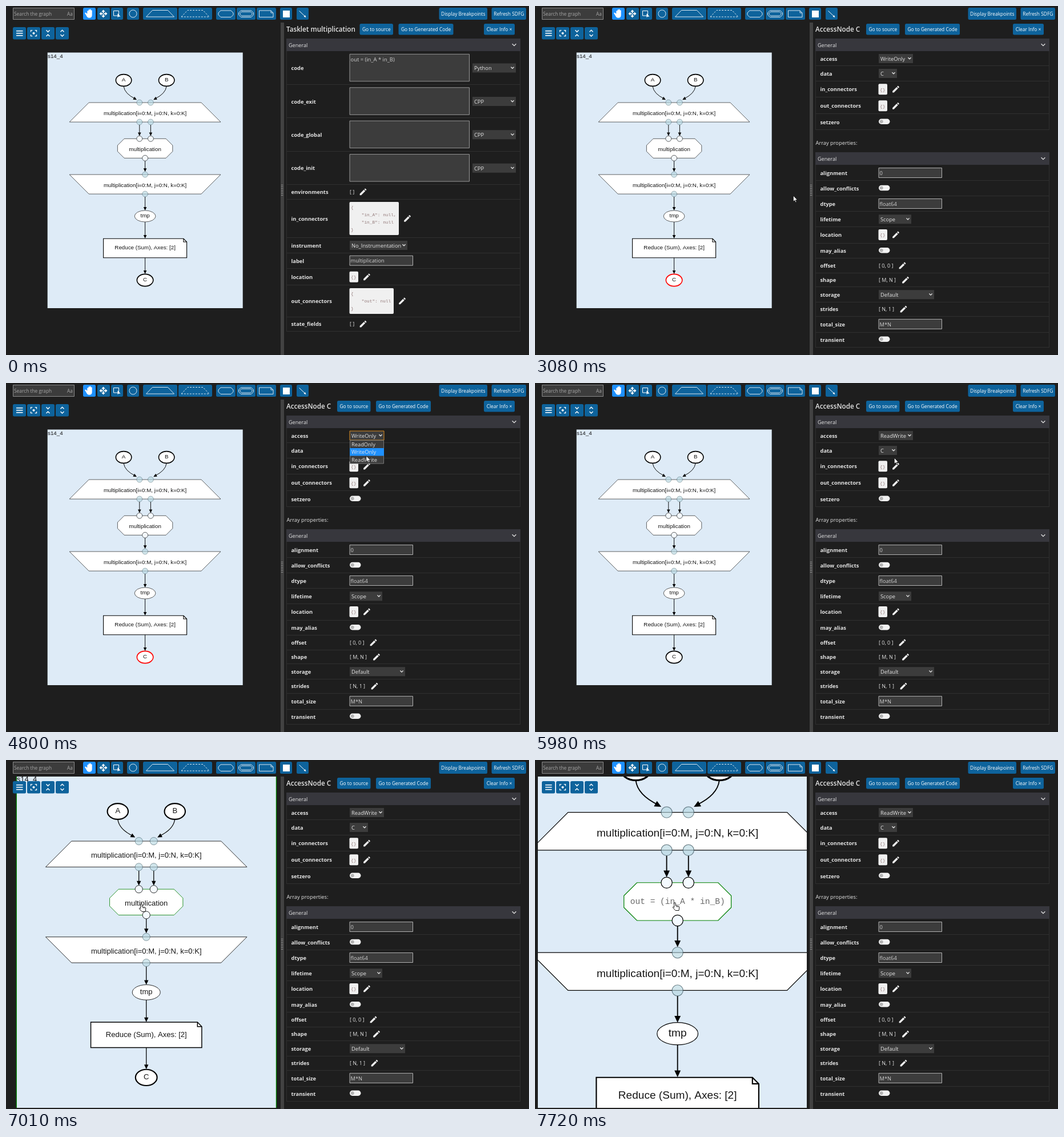
Animation, 916 px wide and 611 px high, one loop 8000 ms. Source, as an HTML page with a canvas:

```html
<!DOCTYPE html>
<html lang="en">
<head>
<meta charset="utf-8">
<title>Graph editor</title>
<style>
html, body { margin: 0; width: 100%; height: 100%; overflow: hidden; background: #1e1e1e; }
canvas { display: block; }
</style>
</head>
<body>
<canvas id="stage" width="916" height="611"></canvas>
<script>
const ctx = document.getElementById('stage').getContext('2d');
const LOOP = 8000;
const UI = '"Open Sans", "Noto Sans", sans-serif';
const ARIAL = '"Liberation Sans", Arial, sans-serif';
const MONO = '"Liberation Mono", "Courier New", monospace';
const BLUE = '#0e639c', BRIGHT = '#1e90ff', FIELD = '#3c3c3c', LINE = '#303030', INK = '#e4e4e4', GREEN = '#008000';

// ---------- drawing helpers ----------
function text(s, x, y, size = 9.3, color = INK, font = UI, weight = 400, align = 'left') {
  ctx.font = `${weight} ${size}px ${font}`;
  ctx.fillStyle = color;
  ctx.textAlign = align;
  ctx.fillText(s, x, y + size * 0.36);
}
function rect(x, y, w, h, fill, stroke, r = 0) {
  ctx.beginPath();
  ctx.roundRect(x, y, w, h, r);
  paint(fill, stroke);
}
function poly(points, fill, stroke, width = 1, open) {
  ctx.beginPath();
  points.forEach(([x, y]) => ctx.lineTo(x, y));
  if (!open) ctx.closePath();
  paint(fill, stroke, width);
}
function oval(x, y, rx, ry, fill, stroke, width = 1) {
  ctx.beginPath();
  ctx.ellipse(x, y, rx, ry, 0, 0, Math.PI * 2);
  paint(fill, stroke, width);
}
function paint(fill, stroke, width = 1) {
  if (fill) { ctx.fillStyle = fill; ctx.fill(); }
  if (stroke) { ctx.strokeStyle = stroke; ctx.lineWidth = width; ctx.stroke(); }
}
function path(d, x, y, scale, fill, stroke, width = 1) {
  ctx.save();
  ctx.translate(x, y);
  ctx.scale(scale, scale);
  const p = new Path2D(d);
  if (fill) { ctx.fillStyle = fill; ctx.fill(p); }
  if (stroke) { ctx.strokeStyle = stroke; ctx.lineWidth = width; ctx.stroke(p); }
  ctx.restore();
}
const octagon = (x, y, w, h, c) => [[x + c, y], [x + w - c, y], [x + w, y + c], [x + w, y + h - c],
  [x + w - c, y + h], [x + c, y + h], [x, y + h - c], [x, y + c]];
const clamp = (v, a, b) => Math.min(b, Math.max(a, v));

// ---------- toolbars ----------
function button(x, y, w, label, h = 21, fill = BLUE) {
  rect(x, y, w, h, fill, null, 2.5);
  if (label) text(label, x + w / 2, y + h / 2, 8.4, '#fff', UI, 400, 'center');
}
function toolbar() {
  const w = '#fff', pale = '#d8e6f0';
  rect(12.5, 3.5, 107, 20, FIELD, '#8a8a8a');
  text('Search the graph', 14, 13.5, 8.4, '#a6a6a6');
  text('Aa', 107, 14.5, 8.2, '#a6a6a6');
  button(135, 3, 22, '', 21, BRIGHT);
  [[160, 22], [184, 21], [212, 21], [240, 60], [302, 59], [368, 34], [404, 33], [439, 34], [480, 21], [509, 21]]
    .forEach(([x, width]) => button(x, 3, width));
  path('M-4 0v-4a1 1 0 0 1 2 0v-2a1 1 0 0 1 2 0v-.6a1 1 0 0 1 2 0v1.6a1 1 0 0 1 2 0v7q0 5-4.5 5-3 0-4.5-3l-3-5q1-1.6 2.5 0z', 146.5, 13.5, 1.05, w);
  for (let i = 0; i < 4; i++) {
    ctx.save();
    ctx.translate(170.5, 13.5);
    ctx.rotate(i * Math.PI / 2);
    poly([[-3.2, -3.4], [0, -7], [3.2, -3.4]], w);
    ctx.fillStyle = w;
    ctx.fillRect(-1, -4, 2, 3);
    ctx.restore();
  }
  rect(188.5, 8.5, 9, 8.5, null, w);
  path('M0 0v7l2-1.6h3z', 195.5, 13, 1, w);
  oval(222.5, 13.5, 6.5, 6.5, null, pale);
  const roof = x => [[x, 19], [x + 11, 7.5], [x + 38, 7.5], [x + 49, 19]];
  poly(roof(245.5), null, pale);
  ctx.setLineDash([3, 2]);
  poly(roof(307), null, pale);
  ctx.setLineDash([]);
  poly(octagon(372, 8, 26, 11.5, 4), null, pale);
  poly(octagon(407.5, 8, 26, 11.5, 4), null, pale);
  poly(octagon(410, 10.2, 21, 7, 2.5), null, pale);
  poly([[443.5, 8], [464, 8], [468, 12], [468, 19.5], [443.5, 19.5]], null, pale);
  poly([[464, 8], [464, 12], [468, 12]], null, pale, 1, true);
  rect(485, 8, 12, 12, w);
  poly([[513.5, 8.5], [524, 18.5]], null, w, 1, true);
  poly([[525.5, 20], [521.5, 18.7], [524, 16]], w);
  button(758.5, 3, 84.5, 'Display Breakpoints');
  button(850.5, 3, 60.5, 'Refresh SDFG');
}
function viewButtons() {
  [12, 37, 62, 87].forEach(x => button(x, 37, 23, '', 21.5));
  const w = '#fff', y = 47.7;
  for (const d of [-4, 0, 4]) rect(18, y + d - 0.8, 11.5, 1.6, w);
  oval(48.5, y, 2, 2, w);
  for (const sx of [-1, 1]) for (const sy of [-1, 1])
    poly([[48.5 + sx * 2.2, y + sy * 5], [48.5 + sx * 5, y + sy * 5], [48.5 + sx * 5, y + sy * 2.2]], null, w, 1.3, true);
  for (const s of [-1, 1]) {
    poly([[70.5, y + s * 5.4], [73.5, y + s * 2.2], [76.5, y + s * 5.4]], null, w, 1.4, true);
    poly([[95.5, y + s * 2.4], [98.5, y + s * 5.4], [101.5, y + s * 2.4]], null, w, 1.4, true);
  }
}

// ---------- property panel ----------
function chevron(x, y, size = 2.6) {
  poly([[x - size, y - size / 2], [x, y + size / 2], [x + size, y - size / 2]], null, INK, 1.3, true);
}
function select(x, y, w, label, border) {
  rect(x, y - 8, w, 16, FIELD, border);
  text(label, x + 3, y + 0.5);
  chevron(x + w - 6, y - 0.5);
}
function pencil(x, y) {
  path('M3 17.25V21h3.75L17.81 9.94l-3.75-3.75zM20.7 7a1 1 0 0 0 0-1.4L18.4 3.3a1 1 0 0 0-1.4 0l-1.8 1.8 3.75 3.75z',
    x - 7.8, y - 7.8, 0.65, '#f0f0f0');
}
const area = (value, lang) => y => {
  rect(602, y - 24.2, 209.5, 47.5, FIELD, '#969696');
  text(value, 603.5, y - 14.5, 9.4, '#d0d0d0');
  select(817, y, 76, lang);
};
const list = (value, penX) => y => { text(value, 602, y + 0.5, 9); pencil(penX, y); };
const choice = (value, w) => y => select(602, y, w, value);
const input = value => y => {
  rect(602, y - 8.8, 110.5, 17, FIELD, '#b0b0b0');
  text(value, 603.5, y, 9.3, '#d0d0d0');
};
const toggle = () => y => {
  rect(602, y - 5.5, 19.5, 9.5, '#f2f2f2', null, 4.7);
  oval(606.7, y - 0.8, 3, 3, '#b4b4b4');
};
const json = (lines, w) => y => {
  const h = lines.length * 13 + 6;
  rect(601.5, y - h / 2, w, h, '#f0f0f0', null, 2);
  lines.forEach((s, i) => text(s, 604, y + (i - (lines.length - 1) / 2) * 13, 7.8, '#957c7c', MONO));
  pencil(601.5 + w + 15, y);
};
const empty = () => json(['{}'], 15.5);

const taskletRows = [
  ['code', 108.5, 137.5, area('out = (in_A * in_B)', 'Python')],
  ['code_exit', 167, 195.5, area('', 'CPP')],
  ['code_global', 225.3, 254, area('', 'CPP')],
  ['code_init', 283.8, 312.5, area('', 'CPP')],
  ['environments', 325.3, 338, list('[ ]', 625.5)],
  ['in_connectors', 372, 405.5, json(['{', '    "in_A": null,', '    "in_B": null', '}'], 86.5)],
  ['instrument', 419, 432, choice('No_Instrumentation', 101)],
  ['label', 446, 459.5, input('multiplication')],
  ['location', 474.3, 488.5, empty()],
  ['out_connectors', 516.5, 544, json(['{', '    "out": null', '}'], 77.5)],
  ['state_fields', 556.7, 569.5, list('[ ]', 625.5)],
];
const nodeRows = [
  ['access', 92, 104.5, () => {}],
  ['data', 118, 131, choice('C', 32)],
  ['in_connectors', 145.7, 159.5, empty()],
  ['out_connectors', 174.8, 188.5, empty()],
  ['setzero', 203, 216.5, toggle()],
];
const arrayRows = [
  ['alignment', 292.3, 305.5, input('0')],
  ['allow_conflicts', 319.3, 332, toggle()],
  ['dtype', 346.3, 359.5, input('float64')],
  ['lifetime', 373.2, 386.5, choice('Scope', 57)],
  ['location', 400.5, 415, empty()],
  ['may_alias', 428.5, 441, toggle()],
  ['offset', 454.5, 467, list('[ 0, 0 ]', 643.5)],
  ['shape', 479.7, 491.5, list('[ M, N ]', 649)],
  ['storage', 505.3, 518, choice('Default', 97)],
  ['strides', 530.7, 543.5, list('[ N, 1 ]', 645.5)],
  ['total_size', 557.2, 571, input('M*N')],
  ['transient', 584, 597.5, toggle()],
];
function group(top, rows) {
  const bottom = rows[rows.length - 1][2];
  rect(491.5, top + 0.5, 409, bottom - top - 0.5, null, LINE);
  rect(491, top, 410, 22, '#37373d');
  text('General', 495, top + 11.3, 9.1);
  chevron(890, top + 11, 3.4);
  for (const [name, y, end, draw] of rows) {
    ctx.fillStyle = LINE;
    ctx.fillRect(491, Math.floor(end), 410, 1);
    text(name, 499.5, y + 0.3, 9.3, INK, UI, 700);
    draw(y);
  }
}
function panelHeader(title, sourceX, codeX) {
  text(title, 491, 40.3, 11.7, INK, UI, 600);
  button(sourceX, 31, 58.5, 'Go to source', 19.5);
  button(codeX, 31, 96, 'Go to Generated Code', 19.5);
  button(837, 31, 54, 'Clear Info ×', 19.5);
}
function panel(t, cursor) {
  if (t < 1840) {
    panelHeader('Tasklet multiplication', 619.5, 687.5);
    group(57, taskletRows);
    return;
  }
  const open = t >= 4210 && t < 5500;
  panelHeader('AccessNode C', 580, 648);
  group(57, nodeRows);
  text('Array properties:', 491.5, 239.5);
  group(256, arrayRows);
  select(602, 92, 60, t < 5500 ? 'WriteOnly' : 'ReadWrite', t >= 4180 && t < 5500 ? '#d98a1e' : null);
  if (!open) return;
  const hot = cursor.y < 100 ? 1 : cursor.y < 114 ? 0 : cursor.y < 128.6 ? 1 : 2;
  rect(602.5, 100.5, 59, 40.5, FIELD, '#767676');
  ['ReadOnly', 'WriteOnly', 'ReadWrite'].forEach((s, i) => {
    if (i === hot) rect(602, 100.5 + i * 13.5, 60, 13.5, BRIGHT);
    text(s, 605, 107.5 + i * 13.5);
  });
}

// ---------- graph ----------
const PIVOT = { x: 237.2, y: 250.8 };
const VIEW = { left: 5, top: 29, right: 476, bottom: 609 };
const STATE = { left: 72.7, top: 81.5, right: 414.7, bottom: 529 };
const MID = 243.6, THIN = 0.62;
const MAP_LABEL = 'multiplication[i=0:M, j=0:N, k=0:K]';
// name, centre x, centre y, half width, half height
const nodes = [
  ['A', 206.1, 130, 13.7, 10.4], ['B', 281.2, 130, 13.7, 10.4],
  ['entry', MID, 186.1, 132.4, 17], ['task', MID, 249.3, 48.2, 17],
  ['exit', MID, 312.1, 132.4, 17], ['tmp', MID, 368, 18.4, 10],
  ['reduce', MID, 424, 73, 16.7], ['C', MID, 480, 14.2, 10.6],
];

function label(s, x, baseline, size = 9.79, font = ARIAL, color = '#161616') {
  ctx.font = `${size}px ${font}`;
  ctx.textAlign = 'center';
  ctx.fillStyle = color;
  ctx.fillText(s, x, baseline);
}
function arrowHead(x, y, angle) {
  ctx.save();
  ctx.translate(x, y);
  ctx.rotate(angle);
  poly([[0, 0], [-6, 2.8], [-6, -2.8]], '#000');
  ctx.restore();
}
function edge(x, y1, y2) {
  poly([[x, y1], [x, y2 - 3]], null, '#000', 0.95, true);
  arrowHead(x, y2, Math.PI / 2);
}
function curve(side) {
  ctx.beginPath();
  ctx.moveTo(MID + side * 37.5, 140.5);
  ctx.quadraticCurveTo(MID + side * 36, 153.5, MID + side * 17, 162.6);
  paint(null, '#000', 0.95);
  arrowHead(MID + side * 14.6, 164.2, side < 0 ? 0.5 : Math.PI - 0.5);
}
function drawNode([name, x, y, w, h], stroke, scale) {
  const l = x - w, r = x + w, t = y - h, b = y + h;
  if (name === 'entry' || name === 'exit') {
    const [a, c] = name === 'entry' ? [34, 0] : [0, 34];
    poly([[l + a, t], [r - a, t], [r - c, b], [l + c, b]], '#fff', stroke, THIN);
    label(MAP_LABEL, x, y + 4.9);
  } else if (name === 'task') {
    poly(octagon(l, t, w * 2, h * 2, 11.7), '#fff', stroke, THIN);
    if (scale > 1.8) label('out = (in_A * in_B)', x, y + 1.9, 7.48, MONO, '#6a6a6a');
    else label('multiplication', x, y + 4.9);
  } else if (name === 'reduce') {
    const f = 5.7;
    poly([[l, t], [r - f, t], [r, t + f], [r, b], [l, b]], '#fff', stroke, 1.1);
    poly([[r - f, t], [r - f, t + f], [r, t + f]], null, stroke, 1.1, true);
    label('Reduce (Sum), Axes: [2]', x, y + 2.45);
  } else {
    oval(x, y, w, h, '#fff', stroke, name === 'tmp' ? THIN : 1.6);
    label(name, x, y + 2.45);
  }
}
function graph(t, cursor, scale) {
  ctx.save();
  ctx.beginPath();
  ctx.rect(VIEW.left, VIEW.top, VIEW.right - VIEW.left, VIEW.bottom - VIEW.top);
  ctx.clip();
  ctx.translate(PIVOT.x, PIVOT.y);
  ctx.scale(scale, scale);
  ctx.translate(-PIVOT.x, -PIVOT.y);

  ctx.beginPath();
  ctx.rect(STATE.left, STATE.top, STATE.right - STATE.left, STATE.bottom - STATE.top);
  paint('#deebf7', cursor.inState ? GREEN : null, 1);
  ctx.font = `9.79px ${ARIAL}`;
  ctx.textAlign = 'left';
  ctx.fillStyle = '#161616';
  ctx.fillText('s14_4', 73, 91);

  const selected = t >= 1840 && t < 5500 ? 'C' : null;
  for (const node of nodes)
    drawNode(node, node[0] === selected ? '#f00' : node === cursor.node ? GREEN : '#000', scale);

  curve(-1);
  curve(1);
  const pair = [MID - 9.8, MID + 9.8];
  pair.forEach(x => edge(x, 208, 227.4));
  [[271.2, 290.2], [334, 358], [378, 407], [440.7, 469]].forEach(([a, b]) => edge(MID, a, b));

  const port = (x, y, solid) => oval(x, y, 4.95, 4.95,
    solid ? '#f4faff' : 'rgba(180,214,224,0.62)', solid ? '#000' : 'rgba(40,65,75,0.6)', THIN);
  for (const x of pair) { port(x, 169.1); port(x, 203.1); port(x, 232.3, true); }
  port(MID, 266.3, true);
  port(MID, 295.1);
  port(MID, 329.1);
  ctx.restore();
}

// ---------- time ----------
// time, x, y, ease amount towards this key
const moves = [
  [160, 727, 606, 0], [950, 266, 529.5, 0.6], [985, 266, 529.5, 0], [990, 265, 527, 0], [1370, 242.5, 480, 0.6],
  [2550, 242.5, 480, 0], [3080, 452, 332.5, 0], [3340, 557, 198, 0], [3390, 557, 198, 0], [4180, 648, 95, 0.6],
  [4450, 648, 95, 0], [4800, 631, 127.5, 0.3], [4830, 630.5, 129, 0], [4970, 630.5, 129, 0], [5100, 629.5, 131, 0],
  [5980, 629.5, 131, 0], [6780, 237, 252, 0.6], [7440, 237, 252, 0], [7590, 244, 250, 0.5], [7719, 244, 250, 0], [7720, 245, 250, 0],
];
const wheel = [6820, 6900, 6990, 7110, 7210, 7310, 7410];
const clicks = [[1710, 1840], [4210, 4250], [5470, 5640]];

function cursorAt(t, scale) {
  if (t < moves[0][0]) return { x: -99, y: -99 };
  let i = moves.findIndex(k => k[0] > t);
  if (i < 0) i = moves.length - 1;
  const [ta, xa, ya] = moves[i - 1], [tb, xb, yb, ease] = moves[i];
  const u = clamp((t - ta) / (tb - ta), 0, 1);
  const p = u + ease * (u * u * (3 - 2 * u) - u);
  const c = { x: xa + (xb - xa) * p, y: ya + (yb - ya) * p };
  const gx = PIVOT.x + (c.x - PIVOT.x) / scale, gy = PIVOT.y + (c.y - PIVOT.y) / scale;
  c.inState = gx > STATE.left && gx < STATE.right && gy > STATE.top && gy < STATE.bottom;
  c.node = nodes.find(([, x, y, w, h]) => Math.abs(gx - x) < w && Math.abs(gy - y) < h);
  return c;
}
function drawCursor(t, { x, y, inState }) {
  if (clicks.some(([a, b]) => t >= a && t < b)) oval(x, y, 7.5, 7.5, 'rgba(255,238,20,0.75)');
  if (inState) {
    path('M-1.3 1a1.3 1.3 0 0 1 2.6 0v4l5 1q1.6.4 1.5 2l-.8 5.5h-6l-4.5-5q-.6-1.4 1-1.3l1.2 1z', x, y, 1, '#fff', '#000', 0.9);
    poly([[x + 3.2, y + 5.6], [x + 3.2, y + 8]], null, '#000', 0.6, true);
    poly([[x + 5.3, y + 6], [x + 5.3, y + 8.2]], null, '#000', 0.6, true);
  } else {
    path('M0 0v10.5l2.4-2.2 1.7 3.7 1.6-.7-1.7-3.6h3.3z', x, y, 1, '#fff', '#000', 0.7);
  }
}
function splitter() {
  rect(481, 29, 6, 582, '#424242');
  ctx.fillStyle = '#c8c8c8';
  for (let y = 313; y < 332; y += 3)
    for (const x of [482, 484]) ctx.fillRect(x, y, 1, 1);
}
function frame() {
  const t = performance.now() % LOOP;
  const scale = 1.1 ** wheel.filter(w => t >= w).length;
  const cursor = cursorAt(t, scale);
  ctx.fillStyle = '#1e1e1e';
  ctx.fillRect(0, 0, 916, 611);
  graph(t, cursor, scale);
  viewButtons();
  toolbar();
  splitter();
  panel(t, cursor);
  drawCursor(t, cursor);
  requestAnimationFrame(frame);
}
frame();
</script>
</body>
</html>
```
